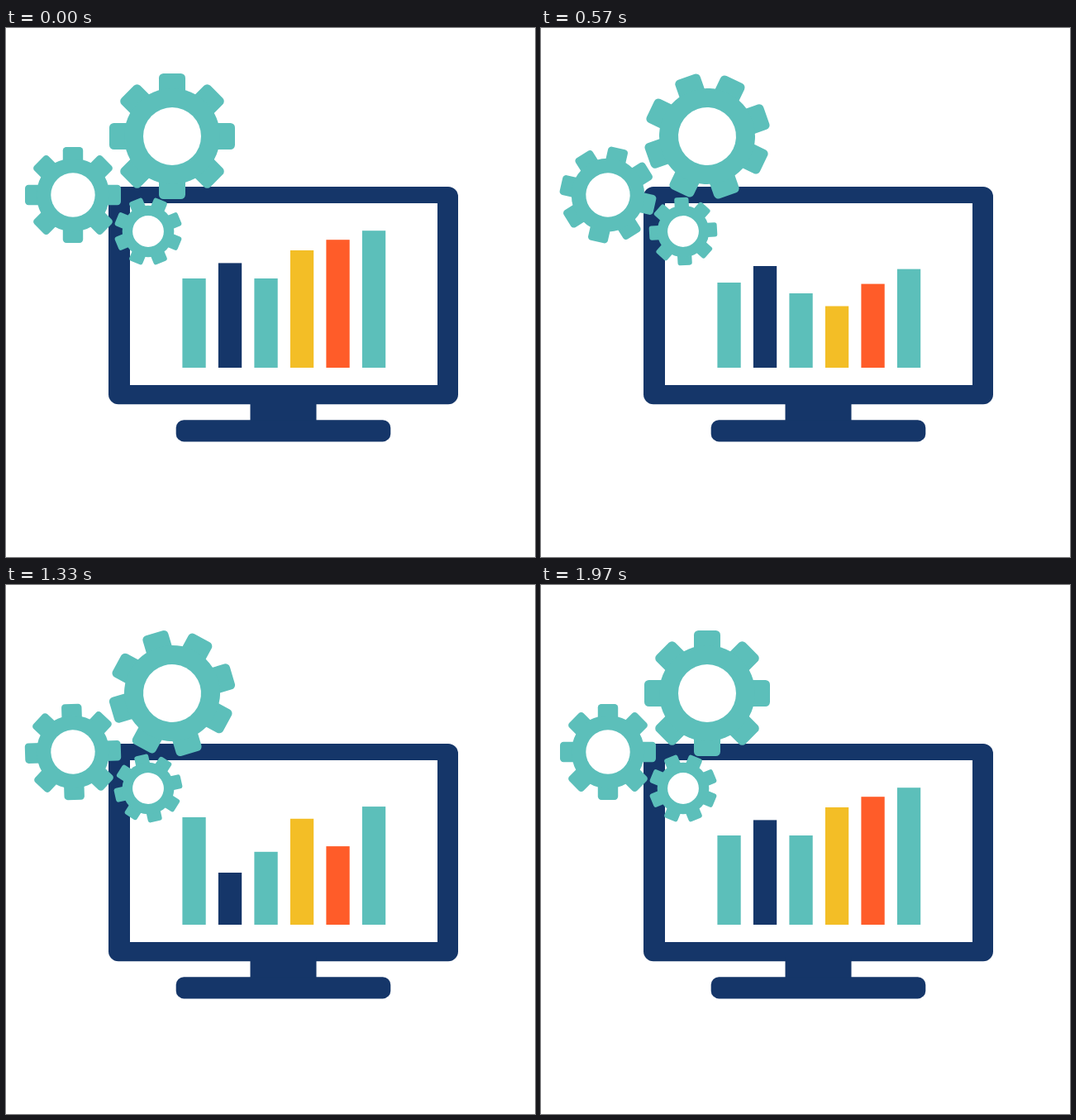
These frames come from a looping animation (640x640 px, 2010 ms). An HTML page:

```html
<!DOCTYPE html>
<html lang="en">
<head>
<meta charset="utf-8">
<title>Dashboard monitor with gears</title>
<style>
  html, body { margin: 0; height: 100%; overflow: hidden; background: #fff; }
  svg { display: block; width: 100%; height: 100%; }
</style>
</head>
<body>
<svg viewBox="0 0 640 640">
  <defs>
    <rect id="spoke" x="-16" y="-76" width="32" height="152" rx="5.5"/>
    <g id="gear">
      <g fill="#5cbfba">
        <use href="#spoke"/>
        <use href="#spoke" transform="rotate(45)"/>
        <use href="#spoke" transform="rotate(90)"/>
        <use href="#spoke" transform="rotate(135)"/>
        <circle r="58"/>
      </g>
      <circle r="35" fill="#fff"/>
    </g>
  </defs>
  <g fill="#153669">
    <rect x="124" y="192" width="423" height="263.3" rx="12"/>
    <rect x="295.5" y="450" width="80" height="30"/>
    <rect x="205.7" y="474.2" width="259.6" height="26.2" rx="9.5"/>
  </g>
  <rect x="150" y="212" width="372" height="220" fill="#fff"/>
  <g id="bars"></g>
  <g id="gears"></g>
</svg>
<script>
const TEAL = '#5cbfba', NAVY = '#153669', YELLOW = '#f3be26', ORANGE = '#ff5c29';
const BASE = 411, LOOP = 2010, LAST = 49;
const keys = [0, 9, 19, 29, 39, LAST];

// y of each bar's top at the key times
const bars = [
  { color: TEAL,   tops: [303, 271, 345, 297, 257, 303] },
  { color: NAVY,   tops: [284.4, 260, 316, 366, 321, 284.4] },
  { color: TEAL,   tops: [303, 297, 345, 308, 345, 303] },
  { color: YELLOW, tops: [269, 354.3, 318.7, 267.3, 306, 269] },
  { color: ORANGE, tops: [256.2, 322.7, 296.5, 336.5, 285.5, 256.2] },
  { color: TEAL,   tops: [245.2, 268.3, 315, 280, 250.2, 245.2] }
];

const gears = [
  { x: 201, y: 131, scale: 1,    start: 0,    turn: -225 },
  { x: 81,  y: 202, scale: .763, start: 0,    turn: -270 },
  { x: 172, y: 246, scale: .54,  start: 22.5, turn: -720 }
];

function add(parent, tag, attrs) {
  const el = document.createElementNS('http://www.w3.org/2000/svg', tag);
  for (const name in attrs) el.setAttribute(name, attrs[name]);
  return document.getElementById(parent).appendChild(el);
}

bars.forEach((bar, i) => {
  bar.el = add('bars', 'rect', { x: 213.4 + 43.5 * i, width: 28.3, fill: bar.color });
});
gears.forEach(gear => gear.el = add('gears', 'use', { href: '#gear' }));

// 25 steps per second shown on a 30 Hz clock with 10 ms resolution
function stepAt(ms) {
  const tick = Math.min(59, Math.floor((Math.floor(ms / 10) * 10 + 5) * 3 / 100));
  return tick - Math.floor((tick + 3) / 6);
}

function topAt(tops, step) {
  const i = Math.max(1, keys.findIndex(key => key >= step));
  const part = (step - keys[i - 1]) / (keys[i] - keys[i - 1]);
  return tops[i - 1] + (tops[i] - tops[i - 1]) * part;
}

function draw() {
  const step = stepAt(performance.now() % LOOP);
  for (const { el, tops } of bars) {
    const top = topAt(tops, step);
    el.setAttribute('y', top);
    el.setAttribute('height', BASE - top);
  }
  for (const { el, x, y, scale, start, turn } of gears) {
    const angle = start + turn * step / LAST;
    el.setAttribute('transform', `translate(${x} ${y}) scale(${scale}) rotate(${angle})`);
  }
  requestAnimationFrame(draw);
}
draw();
</script>
</body>
</html>
```
